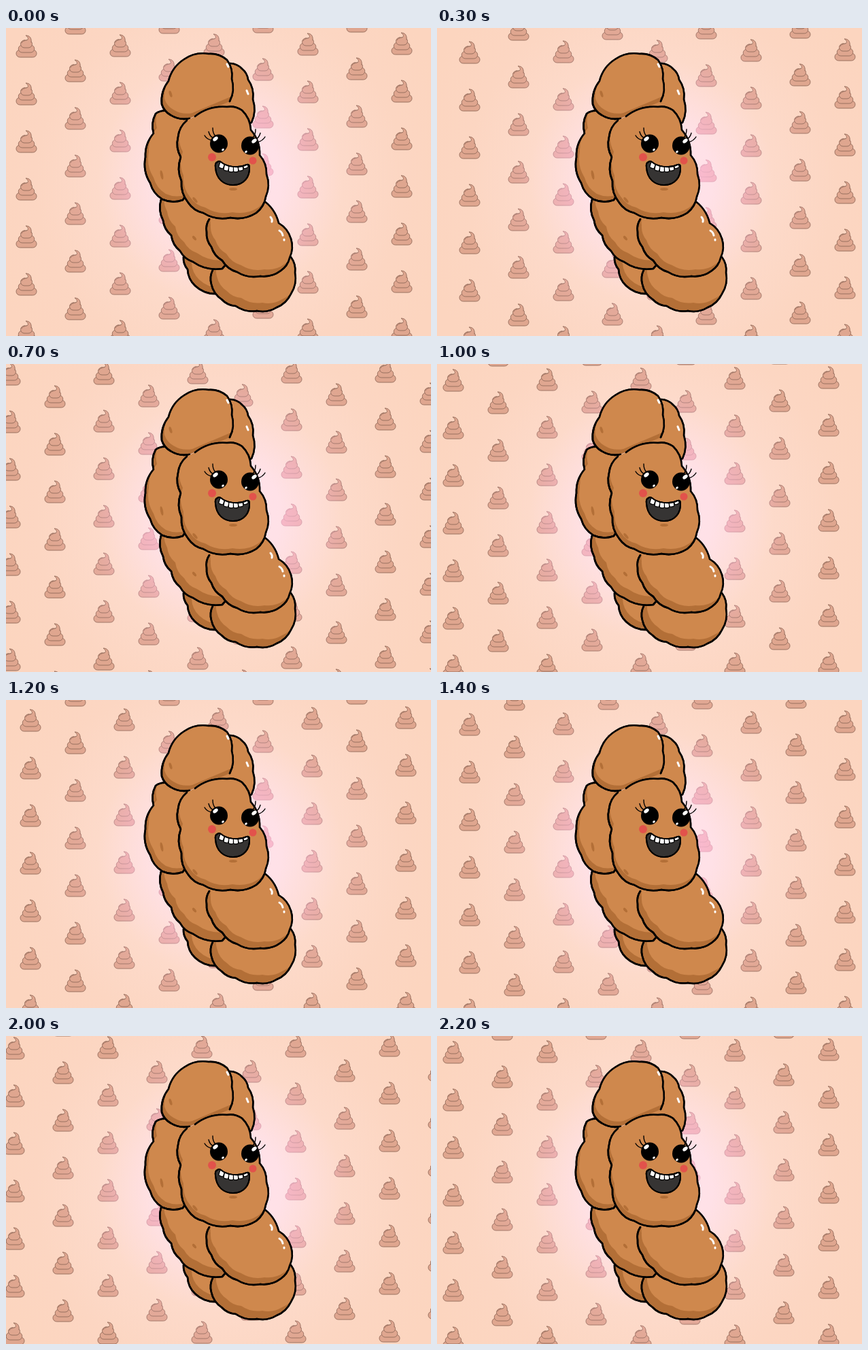
Write an HTML page with a canvas that moves like this. It is 625 px wide and 453 px high and loops after 2300 ms.

```html
<!DOCTYPE html>
<html lang="en">
<head>
<meta charset="utf-8">
<style>
html, body { margin: 0; width: 100%; height: 100%; overflow: hidden; }
canvas { display: block; }
</style>
</head>
<body>
<canvas id="stage" width="625" height="453"></canvas>
<script>
const ctx = document.getElementById('stage').getContext('2d');
const W = 625, H = 453, LOOP = 2300, STEP = 100;
const LIGHT = '#cf884d', DARK = '#b36f37';

// Radial gradient with evenly spaced colours
function glow(radius, ...colors) {
  const g = ctx.createRadialGradient(315, 225, 0, 315, 225, radius);
  colors.forEach((color, i) => g.addColorStop(i / (colors.length - 1), color));
  return g;
}
const backdrop = glow(360, '#ffe2ec', '#ffe1e7', '#fddaca', '#fcd6c2', '#fcd5bf');
const tint = glow(260, ...[.85, .85, .55, .15, 0].map(a => `rgba(255,190,220,${a})`));
const curl = new Path2D('M-7-5C-6-9 0-8 2-10C3-12 2-14-1-16C5-16 8-12 7-6');

// Open outline of rounded bumps between the given notches
function bumps(text) {
  const [first, ...rest] = text.split(' ').map(s => s.split(',').map(Number));
  const path = new Path2D();
  let [x, y] = first;
  path.moveTo(x, y);
  for (const [nx, ny] of rest) {
    const dx = nx - x, dy = ny - y;
    path.quadraticCurveTo(x + dx / 2 - dy * .2, y + dy / 2 + dx * .2, nx, ny);
    [x, y] = [nx, ny];
  }
  return path;
}

// Back to front: notches, then the shift of the lit area
const lobes = [
  ['261,337 267,355 278,379 308,391 330,350', 6, -9],
  ['304,356 302,377 317,399 338,409 369,416 398,411 419,391 425,360 419,337', 8, -12],
  ['228,252 231,283 243,305 256,328 275,344 318,354 340,300 300,245', 6, -13],
  ['299,281 295,300 302,322 318,342 340,359 374,365 404,357 417,338 419,310 401,287 376,252', 6, -10],
  ['238,122 220,126 217,155 205,190 212,228 230,252 260,253 285,140', 5, -8],
  ['290,138 361,139 363,105 356,76 347,60 330,52', 0, 0],
  ['329,108 332,75 325,47 298,38 262,46 239,78 229,112 242,128 270,133', 4, -8],
  ['266,136 253,160 257,190 258,225 268,257 290,272 330,279 368,272 382,248 383,215 373,187 360,150 347,121 325,116 278,130', 3, -8]
].map(([text, dx, dy]) => ({ outline: bumps(text), dx, dy }));

const shine = new Path2D('M325 53L327 57M354 92L356 97M389 278Q392 281 391 285M402 298Q406 300 407 305M409 311V312');
const mouth = new Path2D('M311 197Q307 198 308 205C309 222 320 231 334 231C350 231 359 219 358 204Q358 200 354 201C341 207 324 204 316 197Q313 195 311 197Z');

function ellipse(x, y, rx, ry, color, angle = 0) {
  ctx.beginPath();
  ctx.ellipse(x, y, rx, ry, angle, 0, 7);
  ctx.fillStyle = color;
  ctx.fill();
}

function paint(path, fill, stroke, width) {
  ctx.fillStyle = fill;
  ctx.fill(path);
  ctx.strokeStyle = stroke;
  ctx.lineWidth = width;
  ctx.stroke(path);
}

function roundBox(x, y, w, h, r) {
  const path = new Path2D();
  path.roundRect(x - w / 2, y, w, h, r);
  return path;
}

function icon(x, y) {
  ctx.save();
  ctx.translate(x, y);
  for (let k = 0; k < 3; k++) {
    paint(roundBox(0, 5 - 7 * k, 30 - 6.5 * k, 11, 5.5), '#dfa68f', '#98705f', 1);
  }
  paint(curl, '#dfa68f', '#98705f', 1);
  ctx.restore();
}

function drawPattern(step) {
  for (let i = -3; i < 6; i++) {
    for (let j = -3; j < 8; j++) {
      const x = 30 + 6 * step + 138 * i, y = 27 + 3 * step + 70 * j - i;
      icon(x, y);
      icon(x + 72, y + 36);
    }
  }
  ctx.globalCompositeOperation = 'source-atop';
  ctx.fillStyle = tint;
  ctx.fillRect(0, 0, W, H);
  ctx.globalCompositeOperation = 'destination-over';
  ctx.fillStyle = backdrop;
  ctx.fillRect(0, 0, W, H);
  ctx.globalCompositeOperation = 'source-over';
}

function drawBody() {
  for (const { outline, dx, dy } of lobes) {
    paint(outline, DARK, '#000', 2.6);
    ctx.save();
    ctx.clip(outline);
    ctx.translate(dx, dy);
    ctx.fillStyle = LIGHT;
    ctx.fill(outline);
    ctx.restore();
    ctx.stroke(outline);
  }
  ellipse(242, 97, 2, 5, DARK, -.3);
  ellipse(229, 216, 2, 7, DARK, -.2);
  ellipse(278, 253, 2, 5, DARK, -.7);
  ellipse(277, 309, 2, 4, DARK, -.7);
  ellipse(334, 237, 6, 2, DARK);
  ctx.strokeStyle = '#fff';
  ctx.lineWidth = 3;
  ctx.stroke(shine);
}

function lash(x, y, tipX, tipY, bend) {
  ctx.beginPath();
  ctx.moveTo(x, y);
  ctx.quadraticCurveTo((x + tipX) / 2 + bend, (y + tipY) / 2 + 2, tipX, tipY);
  ctx.stroke();
}

function eye(x, y, glintX, dotX) {
  ellipse(x, y, 13, 13.5, '#000');
  ellipse(glintX, y - 7, 4.2, 2.6, '#fff', -.7);
  ellipse(dotX, y + 9, 2, 1.5, '#fff', -.6);
}

function drawFace() {
  ellipse(303, 190, 6, 6, '#e2524b');
  ellipse(363, 195, 5.5, 5.5, '#e2524b');
  ctx.strokeStyle = '#000';
  ctx.lineWidth = 1.4;
  for (let i = 0; i < 3; i++) {
    lash(302 + 3 * i, 165 - 3 * i, 292 + 6 * i, 158 - 5.5 * i, -2);
    lash(363 + 3.5 * i, 161 + 3.5 * i, 367 + 7 * i, 149 + 5.5 * i, 2);
  }
  eye(313, 170, 308, 319);
  eye(359, 173, 365, 353);

  paint(mouth, '#363433', '#000', 2);
  ctx.save();
  ctx.clip(mouth);
  for (let u = -2.5; u < 3; u++) {
    ctx.save();
    ctx.translate(334.5 + 7 * u, 208 - .9 * u * u);
    ctx.rotate(-.13 * u);
    paint(roundBox(0, -5, 7, 9, 2), '#fff', '#000', 1.2);
    ctx.restore();
  }
  ctx.restore();
  ctx.lineWidth = 2;
  ctx.stroke(mouth);
}

function frame() {
  ctx.clearRect(0, 0, W, H);
  ctx.lineCap = ctx.lineJoin = 'round';
  drawPattern(Math.floor(performance.now() % LOOP / STEP));
  drawBody();
  drawFace();
  requestAnimationFrame(frame);
}
frame();
</script>
</body>
</html>
```
